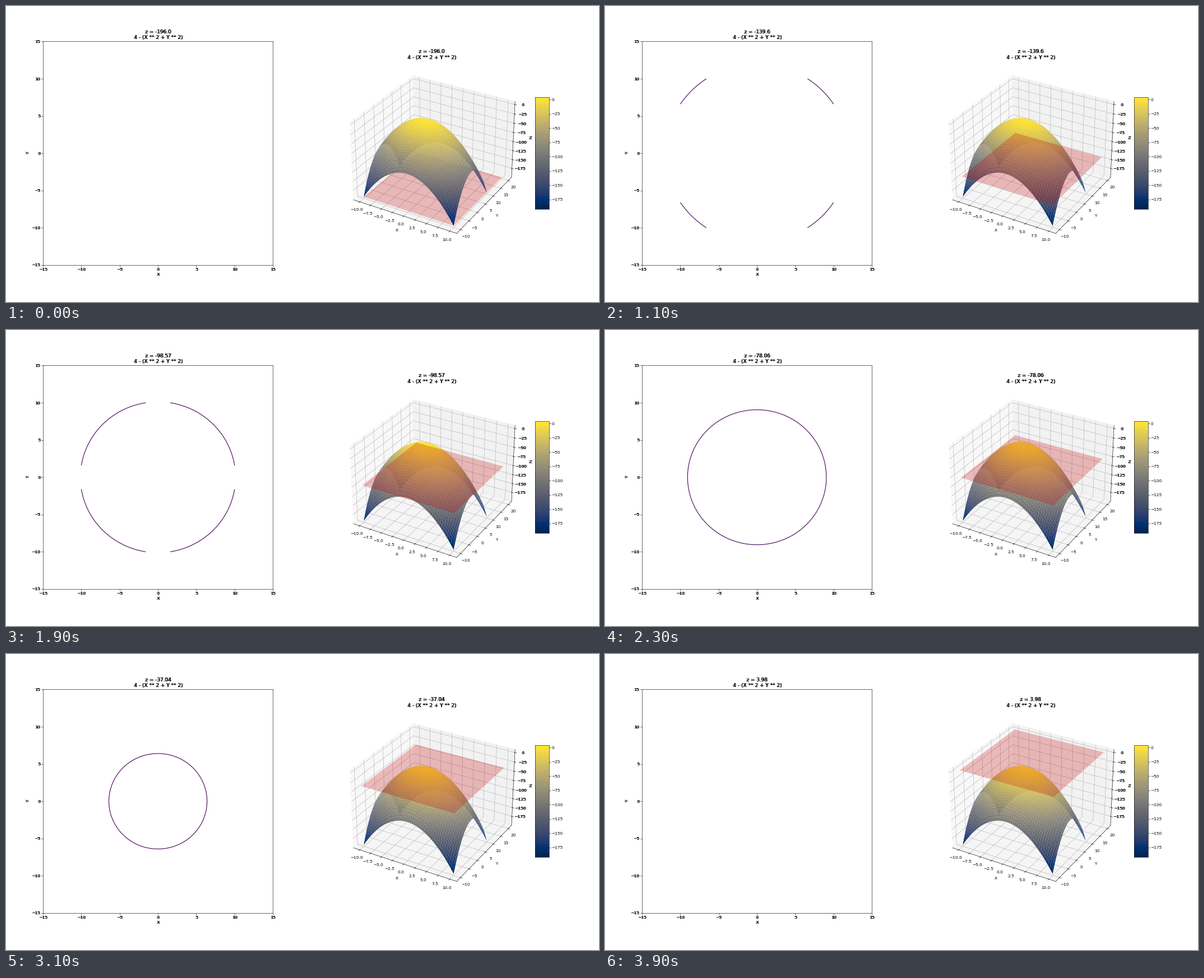
Recreate the animation shown at these times as a matplotlib script. Size 1058x529 px, loop 4000 ms.

```python
import numpy as np
import matplotlib.pyplot as plt
from matplotlib.animation import FuncAnimation
from matplotlib.transforms import Affine2D

plt.rcParams["font.family"] = "DejaVu Sans"
FRAMES, INTERVAL = 40, 100
FORMULA = "4 - (X ** 2 + Y ** 2)"
PAD = 25 / 24  # room between the data limits and the 3D panes

side = np.linspace(-10, 10, 100)
X, Y = np.meshgrid(side, side)
Z = 4 - (X ** 2 + Y ** 2)
levels = np.linspace(Z.min(), Z.max(), FRAMES)


def thicken(text):
    """Draw a text twice, the second time one pixel to the right."""
    draw_once = text.draw

    def draw_twice(renderer):
        draw_once(renderer)
        base = text.get_transform()
        text.set_transform(base + Affine2D().translate(1, 0))
        draw_once(renderer)
        text.set_transform(base)

    text.draw = draw_twice


def thicken_axis(axis, ticks):
    axis.set_ticks(ticks)
    for tick in axis.get_major_ticks():
        thicken(tick.label1)
    thicken(axis.label)


def padded(low, high):
    middle, half = (low + high) / 2, (high - low) / 2 * PAD
    return middle - half, middle + half


fig = plt.figure(figsize=(20, 10), dpi=52.9, facecolor="white")

flat = fig.add_axes([0.0625, 0.125, 0.3875, 0.755])
flat.set(xlim=(-15, 15), ylim=(-15, 15), xlabel="X", ylabel="Y")
for axis in (flat.xaxis, flat.yaxis):
    thicken_axis(axis, range(-15, 16, 5))

solid = fig.add_axes([0.5625, 0.125, 0.3875, 0.755], projection="3d")
surface = solid.plot_surface(X, Y, Z, cmap="cividis")
bar = fig.colorbar(surface, ax=solid, shrink=0.5, aspect=8)
solid.set(xlabel="X", ylabel="Y", zlabel="Z")
z_ticks = range(-175, 1, 25)
thicken_axis(solid.zaxis, z_ticks)
thicken_axis(bar.ax.yaxis, z_ticks)

for ax in (flat, solid):
    thicken(ax.title)

plane_x, plane_y = np.meshgrid([-10, 10], [-10, 20])
moving = []


def update(frame):
    while moving:
        moving.pop().remove()
    z = levels[frame]
    if 0 < frame < FRAMES - 1:
        moving.append(flat.contour(X, Y, Z, levels=[z], cmap="viridis",
                                   vmin=z, vmax=z + 1))
    moving.append(solid.plot_surface(plane_x, plane_y, np.full((2, 2), z),
                                     color="red", alpha=0.25))
    flat.set(xlim=(-15, 15), ylim=(-15, 15))
    solid.set(xlim=padded(-11, 11), ylim=padded(-11.5, 21.5),
              zlim=padded(Z.min(), Z.max()))
    for ax in (flat, solid):
        ax.set_title(f"z = {round(float(z), 2)}\n{FORMULA}")


animation = FuncAnimation(fig, update, frames=FRAMES, interval=INTERVAL,
                          init_func=lambda: update(0), repeat=True,
                          repeat_delay=0)
plt.show()
```
